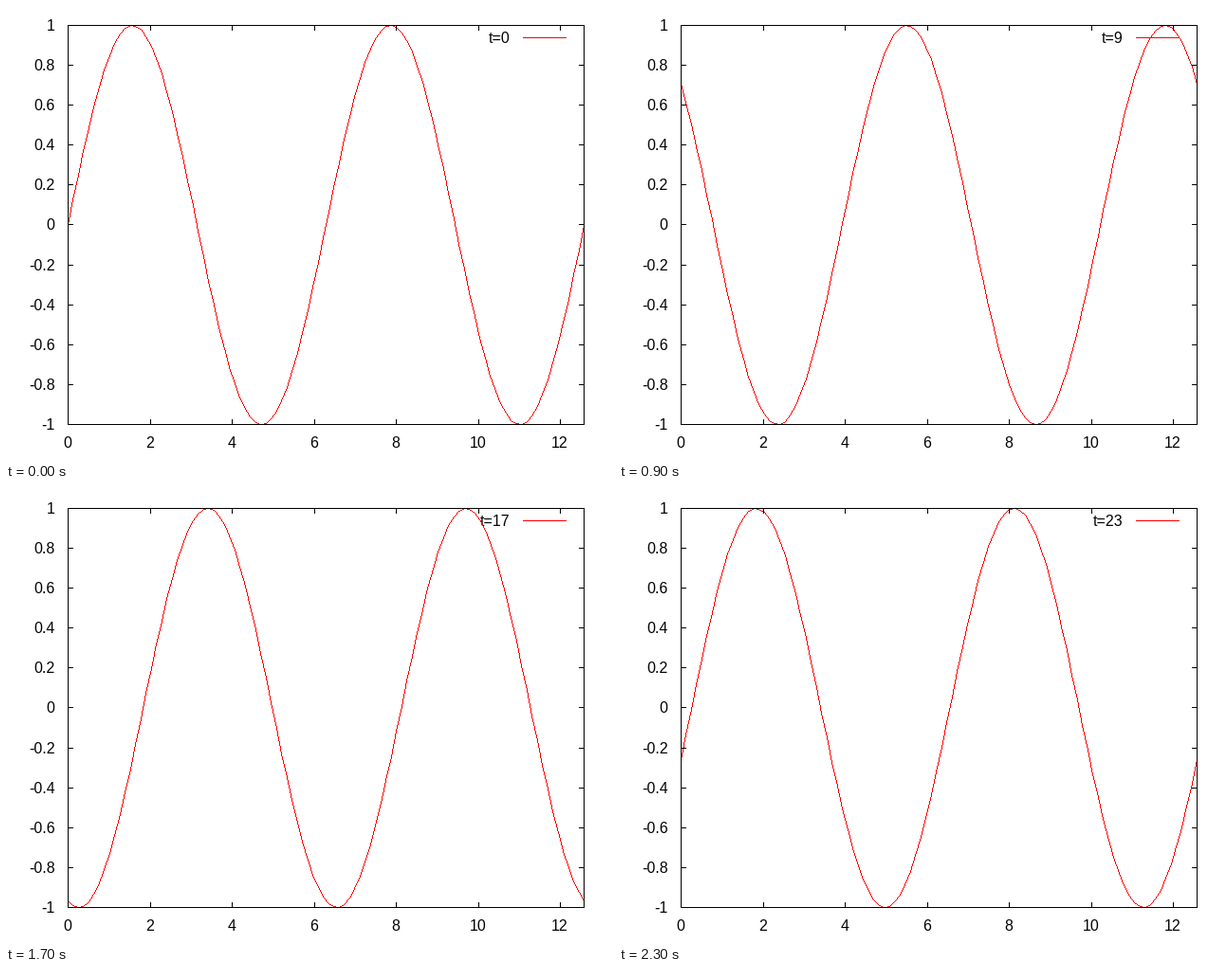
A matplotlib script for the animation above (2.4 s loop, 640x480 px).

```python
import numpy as np
import matplotlib.pyplot as plt
from matplotlib.animation import FuncAnimation

W, H, DPI = 640, 480, 100
LEFT, RIGHT, TOP, BOTTOM = 65, 609, 20, 441
X_MAX = 4 * np.pi
STEPS = 24
TICK = 5
PX = 72 / DPI  # one pixel in points
RED = (1, 0, 0, 1)

plt.rcParams["font.family"] = "Liberation Sans"
plt.rcParams["font.size"] = 16 * PX
plt.rcParams["text.hinting"] = "native"

fig = plt.figure(figsize=(W / DPI, H / DPI), dpi=DPI, facecolor="white")
ax = fig.add_axes([0, 0, 1, 1])
ax.axis("off")


def to_px(x, y):
    """Map data to whole pixel columns and rows."""
    px = LEFT + np.asarray(x) / X_MAX * (RIGHT - LEFT)
    py = TOP + (1 - np.asarray(y)) / 2 * (BOTTOM - TOP)
    return np.floor(px + 0.5).astype(int), np.ceil(py - 0.5).astype(int)


def trace(cols, rows):
    """Image of a one-pixel polyline without smoothing."""
    img = np.zeros((H, W, 4))
    for c0, r0, c1, r1 in zip(cols, rows, cols[1:], rows[1:]):
        n = max(abs(c1 - c0), abs(r1 - r0)) + 1
        c = np.floor(np.linspace(c0, c1, n) + 0.5).astype(int)
        r = np.floor(np.linspace(r0, r1, n) + 0.5).astype(int)
        img[r, c] = RED
    return img


def line(xs, ys, color="black", z=3):
    ax.plot(np.add(xs, 0.5), np.add(ys, 0.5), color=color, lw=PX,
            solid_capstyle="projecting", snap=False, zorder=z)


def label(x, y, text, ha):
    return ax.text(x, y + 6, text, ha=ha, va="baseline", zorder=1)


wave = ax.imshow(np.zeros((H, W, 4)), extent=(0, W, H, 0), aspect="auto",
                 interpolation="nearest", zorder=2)
ax.set_xlim(0, W)
ax.set_ylim(H, 0)
ax.set_autoscale_on(False)

line([LEFT, RIGHT, RIGHT, LEFT, LEFT], [TOP, TOP, BOTTOM, BOTTOM, TOP])

for k in range(-5, 6):
    _, y = to_px(0, k / 5)
    line([LEFT, LEFT + TICK], [y, y])
    line([RIGHT - TICK, RIGHT], [y, y])
    label(51.5, y, f"{k / 5:g}", "right")

for v in range(0, 13, 2):
    x, _ = to_px(v, 0)
    line([x, x], [BOTTOM, BOTTOM - TICK])
    line([x, x], [TOP, TOP + TICK])
    label(x, 460, str(v), "center")

key = label(531, 33, "", "right")
line([545, 590], [33, 33], RED, 1)

xs = np.linspace(0, X_MAX, 100)


def update(step):
    wave.set_data(trace(*to_px(xs, np.sin(xs + 2 * np.pi * step / STEPS))))
    key.set_text(f"t={step}")
    return wave, key


anim = FuncAnimation(fig, update, frames=STEPS, interval=100,
                     repeat=True, repeat_delay=0)
plt.show()
```
